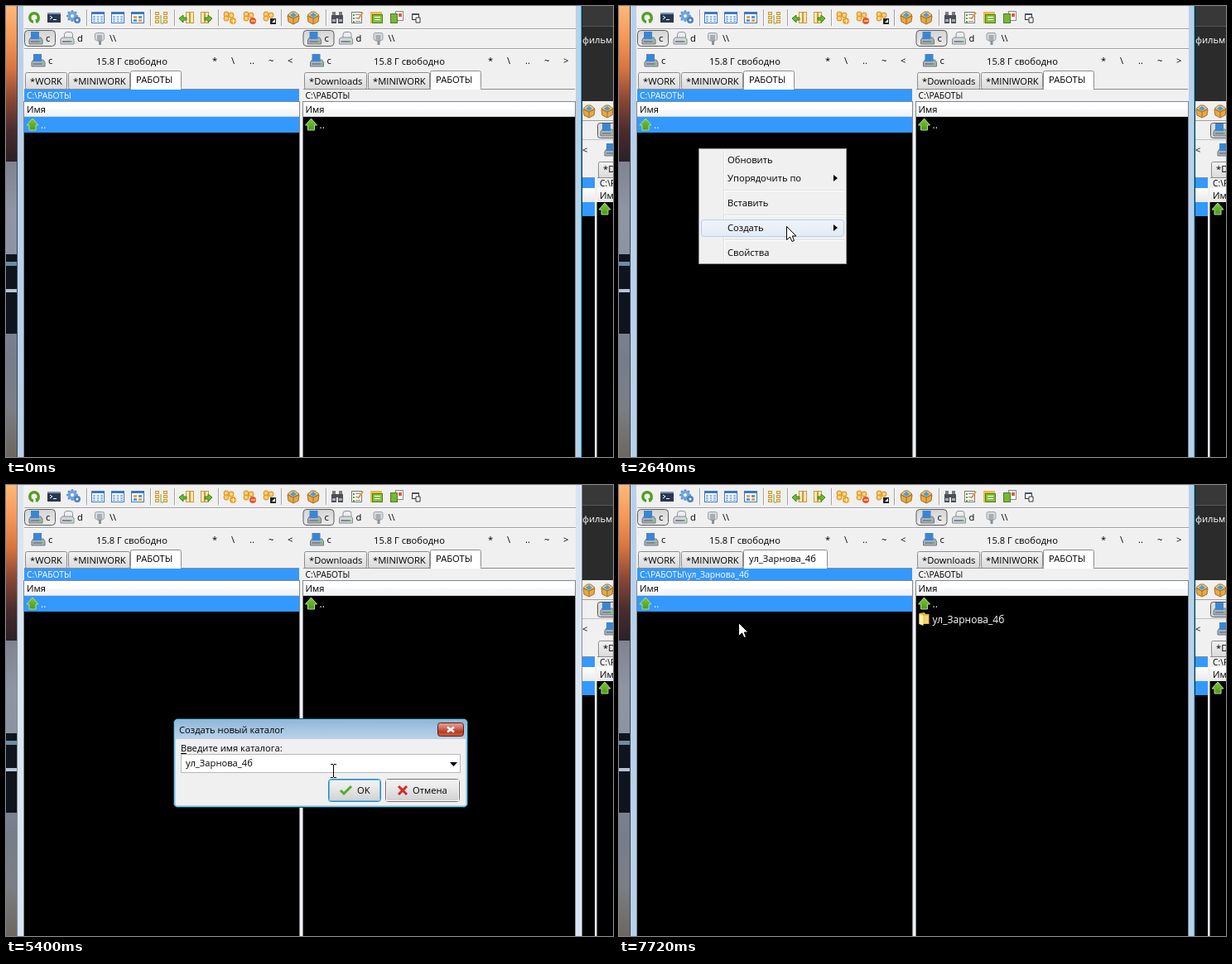
These frames come from a looping animation (733 by 545 pixels, 8000 ms). An HTML page with a canvas:

```html
<!DOCTYPE html>
<html lang="ru">
<head>
<meta charset="utf-8">
<title>Создание каталога</title>
<style>
html, body { margin: 0; width: 100%; height: 100%; overflow: hidden; background: #000; }
canvas { display: block; }
</style>
</head>
<body>
<canvas id="stage" width="733" height="545"></canvas>
<script>
const g = document.getElementById('stage').getContext('2d');
const LOOP = 8000, FOLDER = 'ул_Зарнова_4б';
const FACE = 'px "Open Sans", "Noto Sans", sans-serif';
const BLUE = '#3399ff', FACE_BG = '#f0f0f0', EDGE = '#828790';

// ---- helpers
const clamp = v => Math.max(0, Math.min(1, v));
function rect(x, y, w, h, c) { g.fillStyle = c; g.fillRect(x, y, w, h); }
function frame(x, y, w, h, c) { g.strokeStyle = c; g.lineWidth = 1; g.strokeRect(x + .5, y + .5, w - 1, h - 1); }
function circle(x, y, r, c) { g.fillStyle = c; g.beginPath(); g.arc(x, y, r, 0, 7); g.fill(); }
function path(pts, x, y) {
  g.beginPath();
  for (let i = 0; i < pts.length; i += 2) g.lineTo(x + pts[i], y + pts[i + 1]);
}
function poly(x, y, pts, fill, line) {
  path(pts, x, y); g.closePath();
  g.fillStyle = fill; g.fill();
  if (line) { g.strokeStyle = line; g.lineWidth = 1; g.stroke(); }
}
function stroke(x, y, pts, c, w = 1) { path(pts, x, y); g.strokeStyle = c; g.lineWidth = w; g.stroke(); }
function text(s, x, y, c = '#000', size = 11.2) { g.font = size + FACE; g.fillStyle = c; g.fillText(s, x, y); }
function shade(y0, y1, ...stops) {
  const f = g.createLinearGradient(0, y0, 0, y1);
  stops.forEach((c, i) => f.addColorStop(i / (stops.length - 1), c));
  return f;
}
function round(x, y, w, h, r, fill, line) {
  g.beginPath(); g.roundRect(x + .5, y + .5, w - 1, h - 1, r);
  g.fillStyle = fill; g.fill();
  g.strokeStyle = line; g.lineWidth = 1; g.stroke();
}

// ---- icons, placed by centre
function upArrow(x, y) {
  const shape = [0, -7, 7, 1, 4, 1, 4, 7, -4, 7, -4, 1, -7, 1];
  poly(x, y, shape, shade(y - 7, y + 7, '#7cc63c', '#4a9a1a'), '#b4dd8c');
}
function folder(x, y) {
  poly(x, y, [-6, -7, 0, -8, 2, -6, 6, -6, 6, 6, -6, 6], '#e3bb48');
  poly(x, y, [-6, -6, -1, -4, -1, 8, -6, 6], '#fff0a8');
  rect(x, y - 4, 5, 9, '#f4d774');
}
function drive(x, y, system) {
  if (system) {
    poly(x, y, [-8, 2, -6, -1, 6, -1, 8, 2, 8, 7, -8, 7], '#a9b1ba', '#6f7780');
    rect(x - 6, y - 8, 10, 9, '#3b86d2');
  } else {
    round(x - 4, y - 8, 11, 12, 3, '#eceef0', '#8b9299');
    poly(x, y, [-8, 1, -6, -1, 6, -1, 8, 1, 8, 7, -8, 7], '#d2d6da', '#868d94');
  }
  rect(x - 6, y + 3, 12, 2, '#7f8790');
  rect(x + 4, y + 3, 2, 2, '#5ed33c');
}
function network(x, y) {
  round(x - 6, y - 7, 12, 10, 2, '#d9dcdf', '#9a9fa4');
  rect(x - 3, y - 4, 6, 8, '#a8adb3'); rect(x - 1, y + 3, 3, 5, '#8a8f95');
}
function box(x, y) {
  poly(x, y, [-7, -2, 0, 1, 7, -2, 6, 5, 0, 8, -6, 5], '#e6a94a', '#a8701f');
  poly(x, y, [-7, -3, -2, -7, 2, -7, 7, -3, 0, 1], '#f2ca7e', '#a8701f');
  poly(x, y, [-4, -3, 0, -6, 4, -3, 0, 0], '#4f9bd8');
  stroke(x, y, [0, 1, 0, 8], '#a8701f');
}
function sheet(x, y, c, rows) {
  rect(x - 8, y - 7, 16, 14, '#fff'); frame(x - 8, y - 7, 16, 14, c); rect(x - 8, y - 7, 16, 3, c);
  if (rows) for (let i = 0; i < 4; i++) for (let j = 0; j < 3; j++) rect(x - 6 + j * 4.5, y - 2 + i * 2, 3, 1, '#5b97d8');
  else for (let i = 0; i < 4; i++) rect(x - 5 + i % 2 * 6, y - 2 + (i >> 1) * 4, 4, 3, i % 3 ? '#5b97d8' : '#eea23a');
}
function pieces(x, y, badge) {
  for (const [dx, dy] of [[-4, -4], [-4, 1], [2, -3]]) { circle(x + dx, y + dy, 3.4, '#e09a2a'); circle(x + dx, y + dy, 2.2, '#fbd07a'); }
  if (badge === 2) { rect(x + 1, y + 1, 7, 7, '#222'); poly(x, y, [3, 6, 7, 2, 7, 6], '#fff'); return; }
  circle(x + 4, y + 4, 4, badge ? '#e05a28' : '#f0a01c');
  rect(x + 2, y + 3.5, 5, 1, '#fff');
  if (!badge) rect(x + 4, y + 2, 1, 5, '#fff');
}
function bars(x, y, dir) {
  for (let i = 0; i < 2; i++) {
    const bx = x - dir * 3 + i * 5 - 3;
    rect(bx, y - 7, 5, 14, '#fbe9b4'); frame(bx, y - 7, 5, 14, '#c99a3c');
  }
  poly(x, y, [dir * 8, 1, dir * 3, -3, dir * 3, 0, dir * -1, 0, dir * -1, 3, dir * 3, 3, dir * 3, 6], '#6cbb2c', '#3c801a');
}
function toolbar() {
  const y = 14;
  [97, 174, 203, 256, 332, 386].forEach(x => { rect(x, 4, 1, 20, '#a0a0a0'); rect(x + 1, 4, 1, 20, '#fff'); });
  circle(34, y, 7, '#559e24'); circle(34, y, 3.5, FACE_BG); rect(33, 17, 3, 5, FACE_BG);
  poly(34, y, [1, 2, 7, 2, 4, 7], '#559e24');
  rect(50, 8, 16, 12, '#283850'); rect(50, 8, 16, 2, '#7b93b8'); stroke(53, 12, [0, 0, 3, 2, 0, 4], '#fff'); rect(57, 16, 4, 1, '#fff');
  for (let i = 0; i < 8; i++) {
    const a = i * Math.PI / 4;
    circle(80 + 5.5 * Math.cos(a), 12 + 5.5 * Math.sin(a), 1.6, '#5c91cf');
  }
  circle(80, 12, 5.3, '#6fa4df'); circle(80, 12, 2, '#fff');
  circle(86, 17, 4, '#4a80c0'); circle(86, 17, 1.5, '#fff');
  sheet(111, y, '#3c78c4', true); sheet(135, y, '#3c78c4', true); sheet(159, y, '#3c78c4', false);
  for (let i = 0; i < 3; i++) for (const x of [180, 190]) { rect(x, 7 + i * 5, 5, 4, '#f7dc8c'); frame(x, 7 + i * 5, 5, 4, '#c99a3c'); }
  stroke(183, 11, [4, 0, 4, 10, 7, 10], '#6cab3b');
  bars(217, y, -1); bars(241, y, 1);
  pieces(270, y, 0); pieces(294, y, 1); pieces(318, y, 2);
  box(347, y); box(371, y);
  for (const s of [-1, 1]) {
    rect(400 + s * 4 - 3, 11, 6, 10, '#4c4f55'); rect(400 + s * 4 - 2, 7, 4, 4, '#777b82'); rect(400 + s * 4 - 2, 16, 4, 3, '#a7adb6');
  }
  rect(398, 11, 4, 4, '#4c4f55');
  rect(417, 7, 13, 14, '#fff'); frame(417, 7, 13, 14, '#777');
  for (let i = 0; i < 3; i++) { rect(419, 10 + i * 4, 2, 2, '#5a9d27'); rect(422, 10 + i * 4, 6, 1, '#888'); }
  stroke(425, 16, [0, 0, 6, -8], '#e29a33', 2);
  rect(440, 7, 14, 14, '#e8bc48'); rect(442, 10, 13, 11, '#84bf3a'); frame(442, 10, 13, 11, '#4c8020');
  rect(445, 13, 7, 1, '#fff'); rect(445, 16, 7, 1, '#fff');
  rect(470, 6, 10, 12, '#fff'); frame(470, 6, 10, 12, '#888'); rect(464, 9, 9, 12, '#79b537'); frame(464, 9, 9, 12, '#4c8020'); rect(474, 9, 4, 4, '#e05a38');
  rect(490, 9, 9, 8, '#fff'); frame(490, 9, 9, 8, '#333'); rect(490, 9, 9, 2, '#456'); poly(495, 14, [0, 0, 5, 0, 5, 6, 0, 6], '#fff', '#333');
}

// ---- backdrop
function backdrop() {
  rect(0, 0, 14, 188, shade(0, 188, '#ffb878', '#f59858', '#d9743e', '#8a4834', '#4a2c2e', '#2c2026'));
  rect(0, 188, 14, 357, shade(188, 545, '#80838f', '#8f95a3', '#8b93a2', '#7d8594', '#767d8a', '#7b7e84', '#6c675f'));
  rect(0, 300, 14, 96, '#10141c');
  rect(0, 309, 14, 5, '#6d8ba8'); rect(0, 342, 14, 4, '#b7c4d4');

  rect(695, 0, 38, 116, '#2b2b2b'); rect(695, 0, 38, 24, '#383838'); rect(695, 24, 38, 1, '#555');
  text('фильм', 696, 45, '#fff');
  rect(695, 115, 38, 430, '#000');
  rect(695, 115, 38, 122, FACE_BG);
  box(704, 127); box(726, 127);
  rect(695, 138, 38, 1, '#a0a0a0'); rect(695, 161, 38, 1, '#c0c0c0');
  round(714, 141, 30, 19, 3, '#dcdcdc', '#555'); drive(726, 150, true);
  text('<', 696, 178); drive(731, 174, true);
  round(715, 188, 40, 20, 2, shade(188, 206, '#f4f4f4', '#dcdcdc'), '#8c8c8c'); text('*D', 721, 201);
  rect(695, 207, 38, 1, '#8c8c8c');
  rect(695, 208, 16, 12, BLUE); rect(714, 208, 19, 12, FACE_BG); text('C:\\Р', 717, 218, '#000', 10.2);
  rect(695, 220, 38, 17, shade(220, 237, '#fff', '#e8e8e8')); text('Имя', 717, 233);
  rect(695, 237, 16, 17, BLUE); rect(711, 207, 3, 338, FACE_BG); rect(713, 237, 1, 308, EDGE);
  rect(714, 237, 19, 308, '#000'); upArrow(723, 245);
}

// ---- file panel
function tab(s, x, w, active) {
  const y = active ? 78 : 80;
  round(x, y, w, 101 - y, 2, active ? '#fff' : shade(80, 100, '#f4f4f4', '#dadada'), '#8c8c8c');
  if (active) rect(x + 1, 99, w - 2, 2, '#fff');
  text(s, x + (active ? 7 : 6), active ? 93 : 95);
}
function panel(p) {
  const { x, w, d, m } = p;
  round(22 + d, 29, 38, 20, 4, shade(29, 49, '#d4d4d4', '#ececec'), '#5a5a5a');
  drive(36 + d, 39, true); text('c', 48 + d, 43);
  drive(74 + d, 39, false); text('d', 86 + d, 43);
  network(113 + d, 39); text('\\\\', 125 + d, 43);
  drive(39 + d, 66, true); text('c', 51 + d, 70);
  text('15.8 Г свободно', 109 + (d && 335), 71);
  ['*', '\\', '..', '~', p.side].forEach((s, i) => text(s, [249, 272, 294, 317, 340][i] + m, 70));

  rect(x, 100, w, 1, '#8c8c8c');
  p.tabs.forEach(a => tab(...a));
  const name = p.inside ? FOLDER : 'РАБОТЫ';
  tab(name, p.tabX, p.inside ? 102 : 62, true);
  rect(x, 101, w, 14, p.focus ? BLUE : FACE_BG);
  text('C:\\РАБОТЫ' + (p.inside ? '\\' + FOLDER : ''), 25 + d, 112, p.focus ? '#fff' : '#000', 10.3);

  rect(x - 1, 115, w + 2, 430, EDGE);
  rect(x, 116, w, 9, '#fff'); rect(x, 125, w, 9, shade(125, 134, '#f7f8fa', '#f0f1f3'));
  rect(x, 133, w, 1, '#d5d5d5');
  text('Имя', 25 + d, 129);
  rect(x, 134, w, 411, '#000');
  const list = p.made && !p.inside;
  if (p.focus) rect(x, list ? 153 : 134, w, 19, BLUE);
  upArrow(32 + d, 143); text('..', 42 + d, 148, '#fff', 12);
  if (list) {
    if (p.flash > 0) rect(x, 153, w, 19, `rgba(255,255,255,${p.flash})`);
    folder(32 + d, 162); text(FOLDER, 42 + d, 167, '#fff', 12);
  }
}
function mainWindow(t) {
  const active = t < 3440 || t >= 6200;
  rect(13, 0, 683, 545, active ? '#b9d1ea' : '#d9e5f2');
  rect(13, 0, 1, 545, active ? '#37485a' : '#7f8b97');
  rect(694, 0, 1, 545, active ? '#35c3ee' : '#e6f0fa'); rect(695, 0, 1, 545, active ? '#1b2630' : '#7f8b97');
  rect(21, 0, 667, 545, FACE_BG);
  for (const y of [27, 51]) { rect(22, y, 666, 1, '#a0a0a0'); rect(22, y + 1, 666, 1, '#fff'); }
  toolbar();
  const made = t >= 6240, flash = made ? clamp(1 - (t - 6255) / 525) : 0;
  panel({ x: 22, w: 332, d: 0, m: 0, side: '<', focus: true, made, flash, inside: t >= 7320, tabX: 150,
    tabs: [['*WORK', 23, 51], ['*MINIWORK', 75, 75]] });
  panel({ x: 359, w: 328, d: 336.5, m: 333, side: '>', made, flash, tabX: 512,
    tabs: [['*Downloads', 360, 76], ['*MINIWORK', 437, 75]] });
}

// ---- menus
const menuRows = [['Обновить', 186], ['Упорядочить по', 208, 1], ['Вставить', 238], ['Создать', 268, 1], ['Свойства', 298]];
const subRows = ['Папку', 'Ярлык', '', 'GIMP 2.10.12', 'Классификатор Velmo_Tab 3.x', 'Контакт', 'Ведомость Velmo',
  'Чертеж Velmo_TAB', 'Проект Velmo_Tab 3.x', 'Journal Document', 'Проект Velmo_Tab 2.0', 'Рисунок OpenDocument',
  'Презентация OpenDocument', 'Электронная таблица OpenDocument'];

function menuBox(x, y, w, h) {
  rect(x, y, w, h, FACE_BG); frame(x, y, w, h, '#979797');
  rect(x + 30, y + 3, 1, h - 6, '#e0e0e0'); rect(x + 31, y + 3, 1, h - 6, '#fff');
}
function divider(x, y, w) { rect(x, y, w, 1, '#e0e0e0'); rect(x, y + 1, w, 1, '#fff'); }
function glow(x, y, w) { round(x, y - 10, w, 21, 3, shade(y - 10, y + 11, '#f1f4f8', '#e2ebf6'), '#b4d0ee'); }

function subIcon(i, x, y) {
  if (i === 0) return folder(x, y);
  if (i === 1) { rect(x - 7, y - 7, 14, 14, '#fff'); frame(x - 7, y - 7, 14, 14, '#888'); stroke(x, y, [-3, 5, -2, 0, 3, -2], '#2a4a9c', 2); poly(x, y, [0, -5, 5, -4, 4, 1], '#2a4a9c'); return; }
  if (i === 3) return circle(x, y, 6, '#6e675c');
  if (i === 5) { rect(x - 8, y - 4, 16, 11, '#e6f1fb'); frame(x - 8, y - 4, 16, 11, '#4a86b8'); rect(x - 6, y - 1, 5, 5, '#4a86b8'); rect(x + 1, y, 5, 1, '#777'); rect(x + 1, y + 3, 5, 1, '#777'); return; }
  if (i === 6) return rect(x - 7, y - 7, 14, 14, '#47474f');
  if (i === 7) { rect(x - 8, y - 6, 16, 12, '#fff'); frame(x - 8, y - 6, 16, 12, '#222'); return; }
  if (i === 9) { rect(x - 6, y - 7, 13, 14, '#fff'); frame(x - 6, y - 7, 13, 14, '#345'); rect(x - 6, y - 7, 13, 3, '#3b5f9c'); rect(x - 3, y - 1, 7, 5, '#56708c'); return; }
  if (i >= 11) {
    const c = ['#e8a317', '#d0601c', '#3fa62b'][i - 11];
    poly(x, y, [-5.5, -7.5, 2.5, -7.5, 5.5, -4.5, 5.5, 7.5, -5.5, 7.5], '#fff', c); rect(x - 3, y - 1, 6, 5, c); return;
  }
  rect(x - 7, y - 7, 15, 15, '#168f8c');
}
function menus(t, c) {
  if (t < 1760 || t >= 3440) return;
  g.globalAlpha = clamp((t - 1720) / 80);
  menuBox(96, 172, 179, 140);
  const inSub = c.x > 270;
  for (const [s, y, more] of menuRows) {
    if (inSub ? y === 268 : Math.abs(y - c.y) < 11 && c.x > 96) glow(99, y, 173);
    text(s, 131, y + 4);
    if (more) poly(259, y, [0, -4, 5, 0, 0, 4], '#000');
  }
  [223, 253, 283].forEach(y => divider(127, y - 1, 145));
  g.globalAlpha = clamp((t - 2880) / 120);
  if (g.globalAlpha) {
    menuBox(269, 254, 283, 400);
    subRows.forEach((s, i) => {
      const y = 268 + i * 22 - (i > 2 ? 14 : 0);
      if (!s) return divider(300, 305, 248);
      if (inSub && Math.abs(y - c.y) < 11) glow(272, y, 277);
      subIcon(i, 283, y); text(s, 304, y + 4);
    });
  }
  g.globalAlpha = 1;
}

// ---- dialog
function button(s, x, w, tx, hot, edge) {
  round(x, 355, w, 28, 3, hot ? shade(355, 383, '#eaf6fd', '#d9f0fc', '#bee6fd', '#a7d9f5') : shade(355, 383, '#f2f2f2', '#ebebeb', '#dddddd', '#cfcfcf'), edge);
  frame(x + 1, 356, w - 2, 26, edge === '#707070' ? '#fafafa' : '#52c5ec');
  text(s, tx, 373);
}
function dialog(t, c) {
  const a = Math.min(clamp((t - 3440) / 120), clamp(1 - (t - 6160) / 80));
  if (!a) return;
  g.globalAlpha = a;
  round(202, 282, 356, 108, 5, shade(282, 308, '#8fb3d4', '#a6c5e2', '#bad3ea'), '#2c3e4e');
  g.beginPath(); g.roundRect(203.5, 283.5, 353, 105, 4); g.strokeStyle = '#5fd2f2'; g.stroke();
  rect(205, 307, 350, 80, FACE_BG);
  text('Создать новый каталог', 209, 300);
  round(521, 287, 32, 17, 3, shade(287, 304, '#e6a89c', '#d0796a', '#b93a22', '#cf6a48'), '#5a1d16');
  stroke(537, 295.5, [-4, -3, 4, 3], '#fff', 2.4); stroke(537, 295.5, [4, -3, -4, 3], '#fff', 2.4);

  text('Введите имя каталога:', 211, 322); rect(211, 324, 7, 1, '#000');
  rect(211, 325, 338, 23, '#fff'); frame(211, 325, 338, 23, '#b5bac2');
  poly(536, 335, [0, 0, 9, 0, 4.5, 5], '#000');
  const pasted = t >= 4720;
  if (pasted) text(FOLDER, 217, 340);
  const start = pasted ? 4720 : 3640;
  if (t >= start && Math.floor((t - start) / 520) % 2 === 0) {
    g.font = 11.2 + FACE;
    rect(217 + (pasted ? Math.round(g.measureText(FOLDER).width) : 0), 328, 1, 15, '#000');
  }
  button('OK', 389, 64, 424, c.y > 355 && c.x > 389, '#3c7fb1');
  stroke(410, 369, [-6, 0, -2, 4, 7, -5], '#4fae2c', 3);
  button('Отмена', 458, 90, 491, false, '#707070');
  stroke(479, 369, [-5, -5, 5, 5], '#d42a22', 3); stroke(479, 369, [5, -5, -5, 5], '#d42a22', 3);
  g.globalAlpha = 1;
}

// ---- pointer: time, x, y, easing into that point
const smooth = u => u * u * (3 - 2 * u), speedUp = u => u ** 1.6, slowDown = u => 1 - (1 - u) ** 1.6;
const route = [
  [440, 565, 487], [1240, 97, 174], [2200, 97, 174], [2680, 204, 268], [3040, 204, 268], [3360, 346, 269],
  [3760, 346, 269], [3840, 345, 268], [4840, 345, 268], [4880, 345, 267], [5000, 345, 267],
  [5400, 395, 345, speedUp], [5800, 410, 368, slowDown], [6360, 410, 368], [6640, 222, 206, speedUp],
  [6960, 141, 174, slowDown], [7000, 141, 174], [7440, 139, 165], [7640, 139, 165], [7720, 144, 166]
];
function pointerAt(t) {
  const i = route.findIndex(k => k[0] > t);
  if (i === 0) return { x: -50, y: -50 };
  if (i < 0) return { x: 144, y: 166 };
  const [t0, x0, y0] = route[i - 1], [t1, x1, y1, ease = smooth] = route[i];
  const u = ease((t - t0) / (t1 - t0));
  return { x: Math.round(x0 + (x1 - x0) * u), y: Math.round(y0 + (y1 - y0) * u) };
}
function pointer(t, { x, y }) {
  if (t >= 1320 && t < 2080) circle(96, 172, 12, 'rgba(255,238,0,.6)');
  if (t >= 3560 && t < 6200 && y > 326 && y < 348) {
    rect(x, y - 7, 1, 15, '#000');
    for (const e of [-8, 8]) { rect(x - 3, y + e, 3, 1, '#000'); rect(x + 1, y + e, 3, 1, '#000'); }
    return;
  }
  poly(x + .5, y + .5, [0, 0, 0, 16, 4, 12.5, 6.5, 18, 9, 17, 6.7, 11.5, 11.5, 11.5], '#fff', '#000');
}

function draw(now) {
  const t = Math.floor(now % LOOP / 40) * 40, c = pointerAt(t);
  backdrop();
  mainWindow(t);
  menus(t, c);
  dialog(t, c);
  pointer(t, c);
}
let begin;
function tick(now) {
  begin ??= now;
  draw(now - begin);
  requestAnimationFrame(tick);
}
draw(0);
requestAnimationFrame(tick);
</script>
</body>
</html>
```
